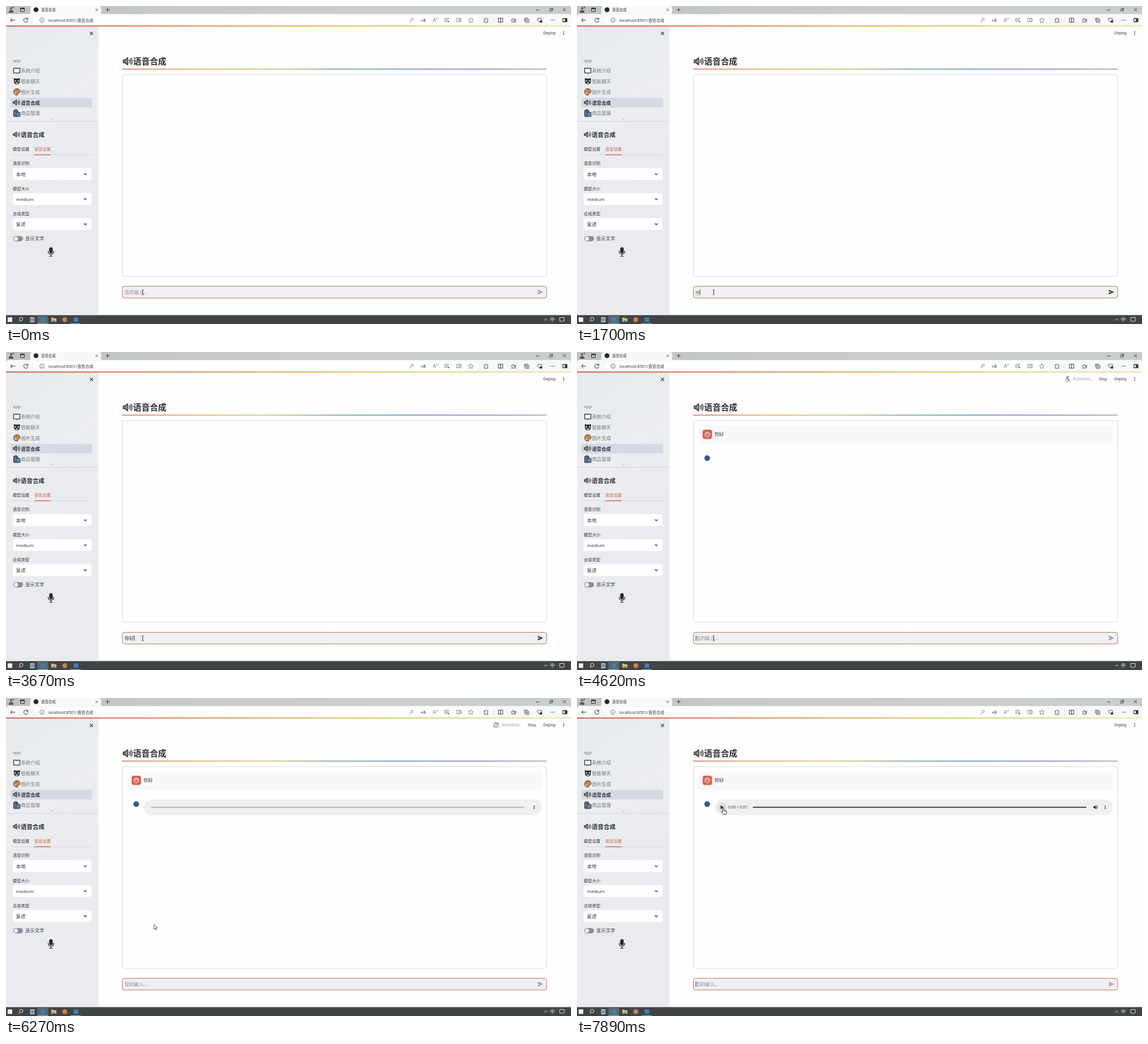
Recreate the animation shown at these times as an HTML page with a canvas. Size 998x561 px, loop 7.99 s.

```html
<!DOCTYPE html>
<html lang="zh-CN">
<head>
<meta charset="utf-8">
<title>语音合成</title>
<style>
html, body { margin: 0; width: 100%; height: 100%; overflow: hidden; background: #fff; }
canvas { display: block; width: 998px; height: 561px; }
</style>
</head>
<body>
<canvas id="stage"></canvas>
<script>
const W = 998, H = 561, LOOP = 7990;
const FONT = '"Noto Sans", "Noto Sans CJK SC", "Noto Sans CJK JP", "Noto Sans CJK", sans-serif';
const INK = '#31333f', DARK = '#2d2f33', ACCENT = '#cb6044';

const canvas = document.getElementById('stage');
const c = canvas.getContext('2d');
const dpr = window.devicePixelRatio || 1;
canvas.width = W * dpr;
canvas.height = H * dpr;

// ---------- helpers ----------
function rect(x, y, w, h, fill) {
  c.fillStyle = fill;
  c.fillRect(x, y, w, h);
}
function box(x, y, w, h, r, fill, stroke, lw = 1) {
  c.beginPath();
  c.roundRect(x, y, w, h, r);
  if (fill) { c.fillStyle = fill; c.fill(); }
  if (stroke) { c.strokeStyle = stroke; c.lineWidth = lw; c.stroke(); }
}
function dot(x, y, r, fill, stroke, lw = 1) {
  c.beginPath();
  c.arc(x, y, r, 0, 7);
  if (fill) { c.fillStyle = fill; c.fill(); }
  if (stroke) { c.strokeStyle = stroke; c.lineWidth = lw; c.stroke(); }
}
function setFont(size, weight = 400) {
  c.font = `${weight} ${size}px ${FONT}`;
}
// text centred vertically on cy
function text(s, x, cy, size, color = INK, weight = 400) {
  setFont(size, weight);
  c.fillStyle = color;
  c.fillText(s, x, cy + size * 0.37);
}
// path centred on x, y
function icon(d, x, y, stroke, lw = 0.9, fill = null, scale = 1) {
  const p = new Path2D(d);
  c.save();
  c.translate(x, y);
  c.scale(scale, scale);
  if (fill) { c.fillStyle = fill; c.fill(p); }
  if (stroke) { c.strokeStyle = stroke; c.lineWidth = lw; c.stroke(p); }
  c.restore();
}
function gradient(x0, y0, x1, y1, colors) {
  const g = c.createLinearGradient(x0, y0, x1, y1);
  colors.forEach((k, i) => g.addColorStop(i / (colors.length - 1), k));
  return g;
}
const CROSS = 'M-2.7-2.7L2.7 2.7M2.7-2.7L-2.7 2.7';
const CHEVRON = 'M-2.4-1.2L0 1.3L2.4-1.2';
const STAR = 'M0-4.4L1.3-1.5L4.4-1.2L2.1 1L2.8 4.2L0 2.5L-2.8 4.2L-2.1 1L-4.4-1.2L-1.3-1.5Z';
const SPLIT = 'M-4-3.5H4V3.5H-4ZM0-3.5V3.5';
function kebab(x, y, gap = 2.4, r = 0.85) {
  for (let i = -1; i < 2; i++) dot(x, y + i * gap, r, DARK);
}

// ---------- browser ----------
function drawBrowser() {
  rect(0, 0, W, 20, gradient(0, 0, W, 0, ['#bfc2c3', '#c8caca', '#cbcecd', '#c9cccd']));
  box(0, 14, W, 24, [5, 5, 0, 0], '#f7f8f8');
  box(43, 0, 125, 16, [4, 4, 0, 0], '#f7f8f8');
  dot(9, 4, 2, '#55585c');
  box(5, 7, 8, 5, [4, 4, 0, 0], '#55585c');
  dot(13, 2.5, 1.7, '#d0563f');
  icon('M-3.5-3H3.5V3.2H-3.5Z', 29, 6.5, DARK, 1);
  rect(25.5, 3.2, 7, 2.2, DARK);
  dot(53, 6.5, 4.3, '#26282b');
  text('语音合成', 62, 6.7, 6.4, '#292b2e');
  icon(CROSS, 160, 6.7, DARK, 0.9, null, 0.8);
  icon('M-3.5 0H3.5M0-3.5V3.5', 179.5, 6.5, DARK);
  icon('M-2.8 0H2.8', 939, 7, DARK);
  icon('M-2.5-1.2H1.3V2.6H-2.5ZM-1.2-2.6H2.6V1.2', 963, 6.5, DARK, 0.8);
  icon(CROSS, 986.5, 6.5, DARK, 0.9);

  box(49, 17, 785, 16, 8, '#fff');
  icon('M4 0H-4M-.8-3.3L-4 0L-.8 3.3', 12, 25, DARK, 1);
  icon('M3.3-1.8A3.7 3.7 0 1 0 3.7.6M3.6-4V-1.5H1.1', 35, 25, DARK, 1);
  dot(63.5, 25, 3.8, null, '#4b4e52', 0.8);
  icon('M0-.5V2.2M0-2V-1.4', 63.5, 25, '#4b4e52', 0.9);
  text('localhost:8501/语音合成', 75, 25, 7.1, '#303236');

  const g = '#686b6f';
  dot(717.5, 23.3, 2, null, g, 0.8);
  icon('M.3-.6L-3 3.2H-1.5', 716, 25, g, 0.8);
  text('aあ', 732.5, 24.5, 6, g, 600);
  text('A', 754, 25.2, 8, g);
  icon('M1.6-2.4Q3-3 2.4-1M3-4Q5-4 3.8-.8', 758, 24.5, g, 0.7);
  icon('M3.4-1V-3.4H-3.4V2.6H-.6M-1.8-.4H1.8M0-2.2V1.4', 778.5, 25, g, 0.8);
  dot(781.2, 27.3, 1.5, g);
  icon('M-4-3.3H4V2.7H.8L0 3.5L-.8 2.7H-4ZM0-3.3V3.2M1.5-1.3H3M1.5.3H3', 800, 25, g, 0.8);
  icon(STAR, 821, 25, g, 0.8);
  icon('M-3.4-2.3H-1A1.3 1.3 0 1 1 1.6-2.3H3.2V-.4A1.2 1.2 0 1 0 3.2 2V3.8H-3.4V1.8A1.2 1.2 0 1 0-3.4-.6Z', 848, 25, DARK, 0.8);
  rect(861, 20, 0.6, 10, '#dcdddf');
  icon(SPLIT, 873.5, 25, DARK, 0.9);
  icon(STAR, 896, 25.4, DARK, 0.8, null, 0.9);
  icon('M1.8-1.4H4.6M2.2.5H4.6M2.6 2.4H4.6', 896.5, 25, DARK, 0.8);
  icon('M-1.8-1.8H4V4H-1.8ZM-3.6 2V-3.6H2M1.1-.4V2.6M-.4 1.1H2.6', 919.5, 25, DARK, 0.8);
  icon('M0 3.4L-3.6-.2A2.1 2.1 0 0 1 0-2.5A2.1 2.1 0 0 1 3.6-.2Z', 942.5, 25, DARK, 0.9);
  dot(945, 27.3, 2.2, DARK);
  for (let i = -1; i < 2; i++) dot(965.5 + i * 2.7, 25, 0.8, DARK);
  box(983, 21.5, 8.5, 7, 1.2, DARK);
  rect(984, 23, 3.3, 4, '#eee');
}

// ---------- page ----------
function speaker(x, y, s) {
  c.save();
  c.translate(x, y);
  c.scale(s, s);
  icon('M-8-2.5H-5L0-6.3V6.3L-5 2.5H-8Z', 0, 0, '#292c31', 1.4, '#8d969c');
  icon('M-5-2.5V2.5', 0, 0, '#292c31', 1);
  icon('M2.4-3Q4.4 0 2.4 3M4.2-4.8Q7.3 0 4.2 4.8M6-6.3Q10.2 0 6 6.3', 0, 0, '#292c31', 1.2);
  c.restore();
}
function drawNavIcons() {
  icon('M-5.5-4.3H-1L0-3.6L1-4.3H5.5V4.2H1L0 5L-1 4.2H-5.5Z', 19, 114, DARK, 1.3, '#f4f5f6');

  icon('M-5.5-5.5L-2.5-4.6H2.5L5.5-5.5L5 2Q4 5.4 0 5.4Q-4 5.4-5 2Z', 19.2, 132.7, null, 0, '#2d2e31');
  icon('M-3.6-2L-1-1L-2 .9L-4 .4ZM3.6-2L1-1L2 .9L4 .4ZM-2.4 2.4H2.4L1.5 4.2H-1.5Z', 19.2, 132.7, null, 0, '#d9dadb');

  icon('M0-5.7C4-5.7 6-3 5.7 0C5.4 2.3 2.5 1 1.8 2.7C1.3 4.3 2.6 5.7 0 5.7C-8 5.5-7.5-5.5 0-5.7Z', 19.2, 151.5, '#4b352a', 1, '#d18a43');
  [[-2.9, -1.2, '#5189ad'], [-.3, -3.3, '#c64c40'], [2.8, -2, '#69a15b'], [-2.6, 2, '#eee']]
    .forEach(([x, y, k]) => dot(19.2 + x, 151.5 + y, 1.1, k));

  speaker(18.6, 170.3, 0.72);

  box(13.5, 184, 7.5, 11, 1, '#45688b', '#2e3841', 1);
  box(18, 187.5, 7, 7.5, 0.6, '#5b89b4', '#2e3841', 0.9);
  icon('M-2 0V-2Q0-3.6 2-2V0', 17.2, 185, '#2e3841', 0.9);
  rect(15, 186.5, 2, 6.5, '#a96d5c');
}
function drawSidebar() {
  rect(0, 36, 163.5, 508, gradient(0, 36, 163, 300, ['#e7eaed', '#ebedf0', '#e9ebf0']));
  icon(CROSS, 151, 48.3, INK, 1.1);
  text('app', 12, 95.7, 7.9, '#74777d');
  box(8, 162, 144, 17, 2.5, '#d5dae2');
  ['系统介绍', '智能聊天', '图片生成', '语音合成', '商品管理'].forEach((s, i) => {
    const on = i === 3;
    text(s, 26.5, 114.2 + i * 18.75, 8.4, on ? '#2b2e39' : '#70737b', on ? 700 : 400);
  });
  drawNavIcons();
  icon(CHEVRON, 82, 199.3, '#777a82', 0.8, null, 0.8);
  rect(0, 203, 163.5, 0.9, '#cfd2d8');

  speaker(18.7, 226.8, 0.72);
  text('语音合成', 26, 226.8, 10.5, '#2c2f3a', 700);
  text('模型设置', 12, 251.8, 7.35);
  text('语音设置', 49.8, 251.8, 7.35, ACCENT);
  rect(12, 262, 139, 1, '#d2d5da');
  rect(50, 261.8, 29, 1.4, ACCENT);
  [['语音识别', '本地'], ['模型大小', 'medium'], ['合成类型', '复述']].forEach(([label, value], i) => {
    const y = 296.5 + i * 44.1;
    text(label, 12, y - 18.8, 7.35);
    box(12, y - 10.5, 139, 21, 4, '#fefefe');
    text(value, 17.8, y, value === 'medium' ? 7.9 : 8.35);
    icon(CHEVRON, 140, y, '#292b31', 1.2);
  });
  box(13, 406, 17, 9.2, 4.6, '#8b8c98');
  dot(17.7, 410.6, 3.5, '#f3f4f6');
  text('显示文字', 34, 410.4, 8.35);

  box(76.3, 425.5, 6.2, 10.5, 3.1, '#26282d');
  icon('M-5-1.5Q-5 4.2 0 4.2Q5 4.2 5-1.5M0 4.2V8M-3 8H3', 79.4, 433.5, '#26282d', 1.2);
}
function drawMain() {
  rect(163.5, 36, W - 163.5, 508, '#fefefe');
  rect(0, 34.4, W, 1.9, gradient(0, 0, W, 0, ['#cb5846', '#d47b4c', '#deaa5e', '#e5cf77', '#eee5a3']));
  text('Deploy', 949, 47.6, 6.75);
  kebab(985, 47.5);
  speaker(215, 97.6, 1);
  text('语音合成', 224.5, 97.8, 14.7, '#2c2f3a', 700);
  rect(205, 110.6, 750, 1.5, gradient(205, 0, 955, 0,
    ['#cf6a55', '#d9a653', '#d3bf6b', '#6a9f85', '#5488b6', '#8177b4', '#9a9caa']));
  box(205.5, 121, 749.5, 356, 4, null, '#d4d6da', 0.9);
}
function drawTaskbar() {
  rect(0, 543.5, W, 2, '#f2f3f3');
  rect(0, 545.5, W, 15.5, '#414445');
  rect(55.5, 545.5, 19, 15.5, '#606567');
  box(3, 549.3, 8, 8, 0, '#f0f1f1');
  dot(26.8, 552.2, 3, null, '#eee', 1);
  icon('M-2.2 2.2L-4.4 4.8', 26.8, 552.2, '#eee', 1);
  box(42.7, 549, 7.5, 9, 0.8, '#a9c3d0');
  rect(44, 551, 5, 5, '#668fa6');
  dot(65, 553.3, 4.3, '#3285b5');
  icon('M-4.5-3.5H-1L0-2.3H4.5V3.8H-4.5Z', 84.5, 553.3, null, 0, '#e3bc62');
  rect(82, 554, 5, 3, '#5d9bc2');
  dot(103.8, 553.3, 4.2, '#cf8345');
  box(119.5, 549.5, 8, 7.5, 0.5, '#457fb6');
  [56, 114].forEach(x => rect(x, 559.7, 18, 1.3, '#75abd0'));
  icon('M-3 1.5L0-1.5L3 1.5', 953.3, 553.3, '#eee', 0.9);
  text('中', 960.8, 553.2, 8.5, '#f2f2f2');
  icon('M-4-3.8H4V2.4H1.5L0 4.2L-1.5 2.4H-4Z', 982, 553.3, '#eee', 0.9);
}

// ---------- animated parts ----------
const SENT = 4460, BLINK = 530;
// [start, value, composing]
const TYPED = [[1240, 'n', 1], [1560, 'ni', 1], [1850, "ni'h", 1], [2010, "ni'ha", 1],
  [2180, "ni'hao", 1], [2600, '你好', 0], [SENT, '', 0]];

function drawInput(t) {
  const step = TYPED.filter(s => s[0] <= t).pop() || [-BLINK + 110 - BLINK, '', 0];
  const [start, value, composing] = step;
  box(205.5, 494.5, 749.5, 20.5, 4, '#eff1f4', ACCENT, 0.9);
  text(value || '您的输入...', 209.6, 504.8, 8.35, value ? INK : '#85878f');
  const w = value ? c.measureText(value).width : 0;
  if (composing) {
    c.setLineDash([1, 0.8]);
    icon(`M0 0H${w}`, 209.6, 509.6, '#555863', 0.7);
    c.setLineDash([]);
  }
  if (Math.floor((t - start) / BLINK) % 2 === 0) rect(209.6 + w, 500, 0.8, 9.6, INK);
  icon('M-4.5-4.2L5 0L-4.5 4.2V1L1 0L-4.5-1Z', 944, 504.7, null, 0, value ? '#3d3f48' : '#9b9da4');
}

function drawRunning(t) {
  if (t < 4480 || t > 6560) return;
  const k = '#686b73';
  if (t < 5980) {
    dot(867.5, 43.8, 1.3, k);
    dot(865.5, 49.6, 2.7, null, k, 0.9);
    icon('M1.2-2L-1.8-1.3M1-2L.2 1H3L3.4 4.6M-2.6-2.3L-1.2-3.4L1-2', 866, 47.5, k, 1);
  } else {
    dot(868.6, 45, 1.3, k);
    icon('M-4-3.3L0-3.7L2.6.5M-4.2.4L-.3-2', 865.5, 47, k, 1.1);
    const wave = 'M-5 0Q-3.4-1.6-1.7 0T1.7 0T5 0';
    icon(wave, 865.5, 48.8, k, 0.9);
    icon(wave, 865.5, 51.3, k, 0.9);
  }
  text('RUNNING...', 876, 47.6, 6.4, '#9b9da4');
  text('Stop', 921.7, 47.6, 6.75);
}

function drawPlayer(y, state, hover) {
  box(243, y - 14, 703.5, 28, 14, '#eff1f1');
  const ready = state === 'ready', ink = ready ? '#27292b' : '#a5a7a8';
  if (hover) dot(256, y, 8.5, '#dcdfdf');
  if (state === 'loading') {
    box(256, y - 1, 660, 2, 1, '#b5b7b8');
  } else {
    icon('M-2.3-3.3L3.3 0L-2.3 3.3Z', 256, y, null, 0, '#27292b');
    text(ready ? '0:00 / 0:01' : '0:00 / 0:00', 267, y, 7.1, '#37393b');
    box(310.5, y - 1, 589.5, 2, 1, ready ? '#3f4142' : '#b9bbbc');
    icon('M-4-1.4H-2L.4-3.5V3.5L-2 1.4H-4Z', 916, y, null, 0, ink);
    icon('M1.4-1.6Q2.6 0 1.4 1.6M1.4-3.5Q5.6 0 1.4 3.5', 916, y, ink, 0.9);
  }
  kebab(933, y, 2.3, 0.9);
}

function drawChat(t) {
  if (t < 4500) return;
  box(214, 129, 732.5, 32.5, 4, '#f7f8f9');
  box(222, 137, 16.5, 16.5, 4, '#da604e');
  dot(230.2, 145.5, 4.2, null, '#fff', 1);
  icon('M-4-1.2Q-1.2-.8 0-3.2Q1.4-1.2 4-1.2', 230.2, 145.5, '#fff', 0.9);
  dot(228.7, 146.4, 0.6, '#fff');
  dot(231.8, 146.4, 0.6, '#fff');
  text('你好', 242.7, 145.3, 8.35);
  if (t < 4560) return;
  dot(230, 187.2, 5, '#315b91');

  const waiting = t < 6040;
  if (waiting && t >= 4720) {
    dot(248.5, 185.2, 5, null, '#dfe2e7', 1.5);
    const a = (t - 5510) / 750 * Math.PI * 2 + Math.PI;
    c.beginPath();
    c.arc(248.5, 185.2, 5, a - 0.8, a + 0.8);
    c.strokeStyle = '#3f76ac';
    c.lineWidth = 1.5;
    c.stroke();
    text('处理中，请稍等...', 258, 185.2, 8.35);
  }
  if (t >= 5280) {
    const state = waiting ? 'empty' : t < 6500 ? 'loading' : 'ready';
    drawPlayer(waiting ? 213.8 : 192.7, state, t > 7180);
  }
}

// [time, x, y] of the pointer hotspot
const PATH = [[6070, 241.5, 505], [6270, 261.3, 399.5], [6780, 268, 236], [7250, 258.3, 193.5]];
function pointerAt(t) {
  const i = PATH.findIndex(p => p[0] > t);
  if (i === 0) return PATH[0].slice(1);
  if (i < 0) return PATH[PATH.length - 1].slice(1);
  const [t0, x0, y0] = PATH[i - 1], [t1, x1, y1] = PATH[i];
  let u = (t - t0) / (t1 - t0);
  if (i === PATH.length - 1) u = 1 - (1 - u) ** 2;
  return [x0 + (x1 - x0) * u, y0 + (y1 - y0) * u];
}
function drawPointer(t) {
  const [x, y] = pointerAt(t);
  if (y > 494) {
    icon('M-1.7-4.3Q0-4.3 0-3.3Q0-4.3 1.7-4.3M0-3.4V3.4M-1.7 4.3Q0 4.3 0 3.3Q0 4.3 1.7 4.3', x, y, '#222', 0.9);
  } else if (y > 206.5) {
    icon('M0 0V8.6L2 6.8L3.4 9.8L4.8 9.2L3.5 6.3H6Z', x, y, '#33363a', 0.8, '#fff');
  } else {
    icon('M-1 1Q0-.4 1 1V4.6L4.8 5.3Q6.2 5.7 6 7.2L5.3 11.8H-.2L-3.2 7.8Q-3.4 6.2-1 7.3Z', x, y, '#25272a', 0.9, '#fff');
    icon('M2.7 5V7M4.4 5.3V7.2', x, y, '#25272a', 0.6);
  }
}

function frame(now) {
  const t = now % LOOP;
  c.setTransform(dpr, 0, 0, dpr, 0, 0);
  c.lineJoin = 'round';
  drawBrowser();
  drawSidebar();
  drawMain();
  drawRunning(t);
  drawChat(t);
  drawInput(t);
  drawTaskbar();
  drawPointer(t);
}
const begin = performance.now();
function tick() {
  frame(performance.now() - begin);
  requestAnimationFrame(tick);
}
tick();
</script>
</body>
</html>
```
